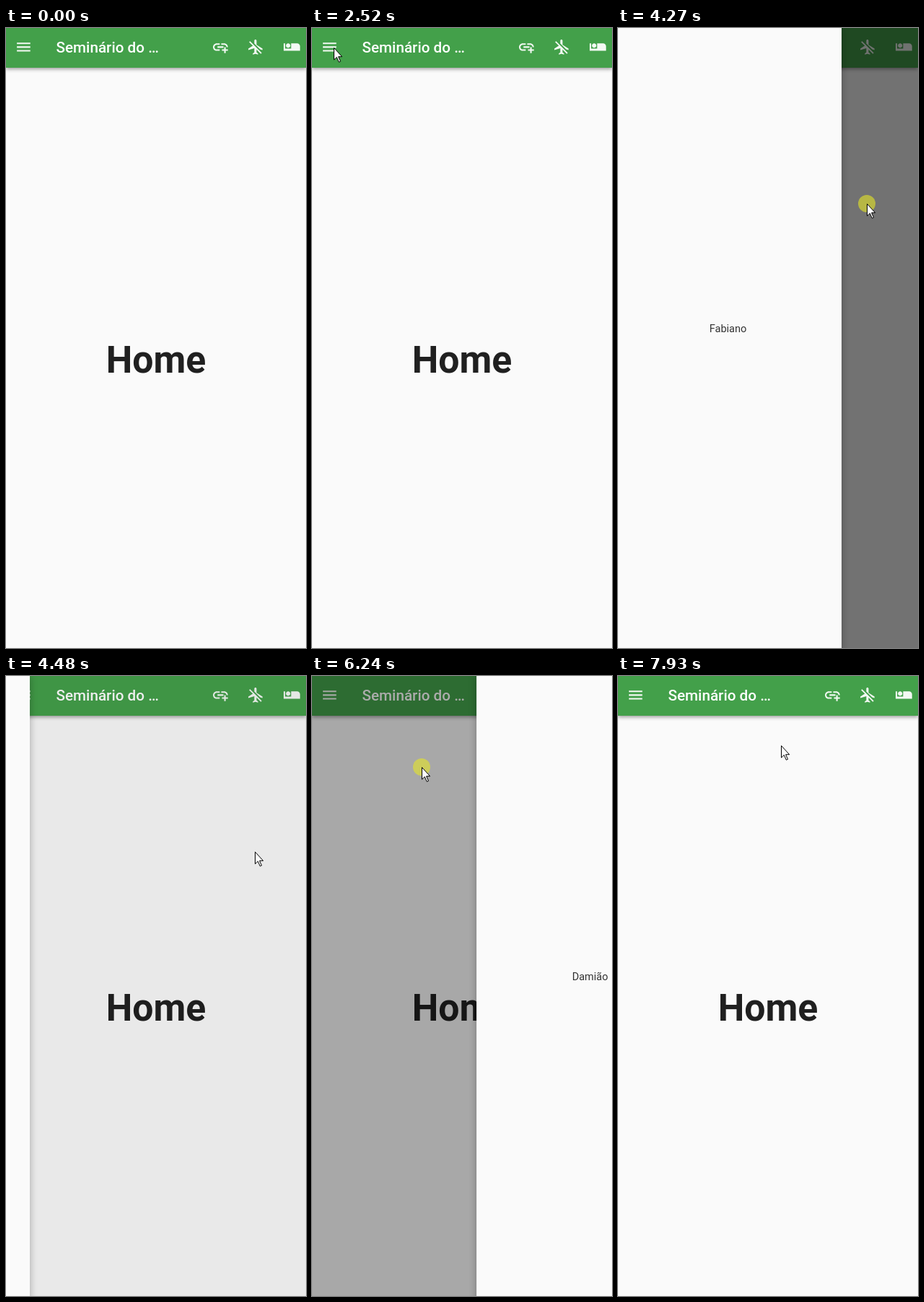
These frames come from a looping animation (416x858 px, 7990 ms). An HTML page:

```html
<!DOCTYPE html>
<html lang="pt">
<head>
<meta charset="utf-8">
<title>Drawers</title>
<style>
  html, body { margin: 0; width: 100%; height: 100%; overflow: hidden; }
  body { background: #fafafa; font-family: Roboto, sans-serif; color: #202020; }
  #stage { position: absolute; left: 0; top: 0; width: 416px; height: 858px; overflow: hidden; background: #fafafa; }
  #stage * { position: absolute; white-space: nowrap; }
  #bar {
    left: 0; top: 0; width: 416px; height: 55px; background: #43a04a; color: #fff;
    box-shadow: 0 2px 5px rgba(0,0,0,.38);
  }
  #bar svg { top: 14.4px; width: 24.8px; height: 24.8px; margin-left: -12.4px; fill: #f4f9f4; }
  #title { left: 69.5px; top: 12px; font-size: 20.7px; font-weight: 500; line-height: 30px; }
  #home { left: 0; top: 430px; width: 416px; text-align: center; font-size: 51.75px; font-weight: 700; line-height: 60px; }
  #scrim { left: 0; top: 0; width: 416px; height: 858px; background: #000; }
  .drawer { top: -3px; width: 315px; height: 864px; background: #fafafa; box-shadow: 0 3px 10px rgba(0,0,0,.3); }
  .drawer span { left: 0; top: 409.5px; width: 100%; text-align: center; font-size: 14.5px; line-height: 20px; color: #333; }
  #left { left: -320px; }
  #right { left: 421px; }
  #mouse { left: 0; top: 0; width: 0; height: 0; }
  #press { left: -12px; top: -12px; width: 24px; height: 24px; border-radius: 50%; background: rgba(232,232,35,.58); }
  #mouse svg { left: 0; top: 0; width: 14px; height: 22px; }
</style>
</head>
<body>
<div id="stage">
  <div id="home">Home</div>
  <div id="bar">
    <svg viewBox="0 0 24 24" style="left:24px"><path d="M3 18h18v-2H3zm0-5h18v-2H3zm0-7v2h18V6z"/></svg>
    <div id="title">Seminário do …</div>
    <svg viewBox="0 0 24 24" style="left:297px"><path d="M8 11h8v2H8zm12.1 1H22c0-2.76-2.24-5-5-5h-4v1.9h4c1.71 0 3.1 1.39 3.1 3.1zM3.9 12c0-1.71 1.39-3.1 3.1-3.1h4V7H7c-2.76 0-5 2.24-5 5s2.24 5 5 5h4v-1.9H7c-1.71 0-3.1-1.39-3.1-3.1zM19 12h-2v3h-3v2h3v3h2v-3h3v-2h-3z"/></svg>
    <svg viewBox="0 0 24 24" style="left:346.5px"><path d="M13 9V3.5c0-.83-.67-1.5-1.5-1.5S10 2.67 10 3.5v3.68l7.83 7.83L21 16v-2zM3 5.27l4.99 4.99L2 14v2l8-2.5V19l-2 1.5V22l3.5-1 3.5 1v-1.5L13 19v-3.73L18.73 21 20 19.73 4.27 4z"/></svg>
    <svg viewBox="0 0 24 24" style="left:396.5px"><path d="M7 13c1.65 0 3-1.35 3-3S8.65 7 7 7s-3 1.35-3 3 1.35 3 3 3zM19 7h-8v7H3V7H1v10h22v-6c0-2.21-1.79-4-4-4z"/></svg>
  </div>
  <div id="scrim"></div>
  <div id="left" class="drawer"><span>Fabiano</span></div>
  <div id="right" class="drawer"><span>Damião</span></div>
  <div id="mouse">
    <div id="press"></div>
    <svg viewBox="0 0 14 22"><path d="M.5.5V17l3.8-3.6 3 6.8 2.2-1-2.9-6.5h5.1z" fill="#fff" stroke="#000"/></svg>
  </div>
</div>
<script>
const LOOP = 7990, WIDTH = 315, ENTER = 600;
const $ = id => document.getElementById(id);

// Each mouse move eases out to its point: start, end, x, y
const MOVES = [
  [ENTER, 1390, 82, 74],    // in from the bottom
  [1390, 2240, 30, 27],     // to the menu button
  [3050, 3100, 83, 87],
  [3130, 3720, 345, 243],   // to the scrim
  [4600, 5220, 408, 110],   // to the right edge
  [5620, 5900, 402, 119],
  [5980, 6235, 152, 126],   // drag the right drawer
  [6250, 7170, 52, 161],    // to the scrim
  [7560, 7925, 226, 96]
];
const CLICKS = [2440, 4210, 7390], CLICK_MS = 80;
const DRAG_START = 5900, DRAG_END = 6380;

function mouse(t) {
  let x = 245, y = 788;
  for (const [start, end, toX, toY] of MOVES) {
    const f = Math.min(1, Math.max(0, (t - start) / (end - start)));
    const ease = 1 - (1 - f) ** 2;
    x += (toX - x) * ease;
    y += (toY - y) * ease;
  }
  return [Math.round(x), Math.round(y)];
}

// Critically damped spring from 0 to 1
function spring(ms, speed = .0224) {
  const x = Math.max(0, ms) * speed;
  return 1 - (1 + x) * Math.exp(-x);
}

function place(el, open, dir) {
  el.style.visibility = open > .004 ? "visible" : "hidden";
  el.style.transform = `translateX(${dir * open * WIDTH}px)`;
}

function draw() {
  const t = performance.now() % LOOP;
  const left = spring(t - 2570) - spring(t - 4318);
  const right = spring(t - 6032, .0099) - spring(t - 7540);
  place($("left"), left, 1);
  place($("right"), right, -1);
  $("scrim").style.opacity = .54 * Math.max(left, right, 0);

  const [x, y] = mouse(t);
  const pressed = CLICKS.some(c => t >= c && t < c + CLICK_MS) || (t >= DRAG_START && t < DRAG_END);
  $("mouse").style.visibility = t < ENTER ? "hidden" : "visible";
  $("mouse").style.transform = `translate(${x}px, ${y}px)`;
  $("press").style.opacity = pressed ? 1 : 0;
  requestAnimationFrame(draw);
}
draw();
</script>
</body>
</html>
```
